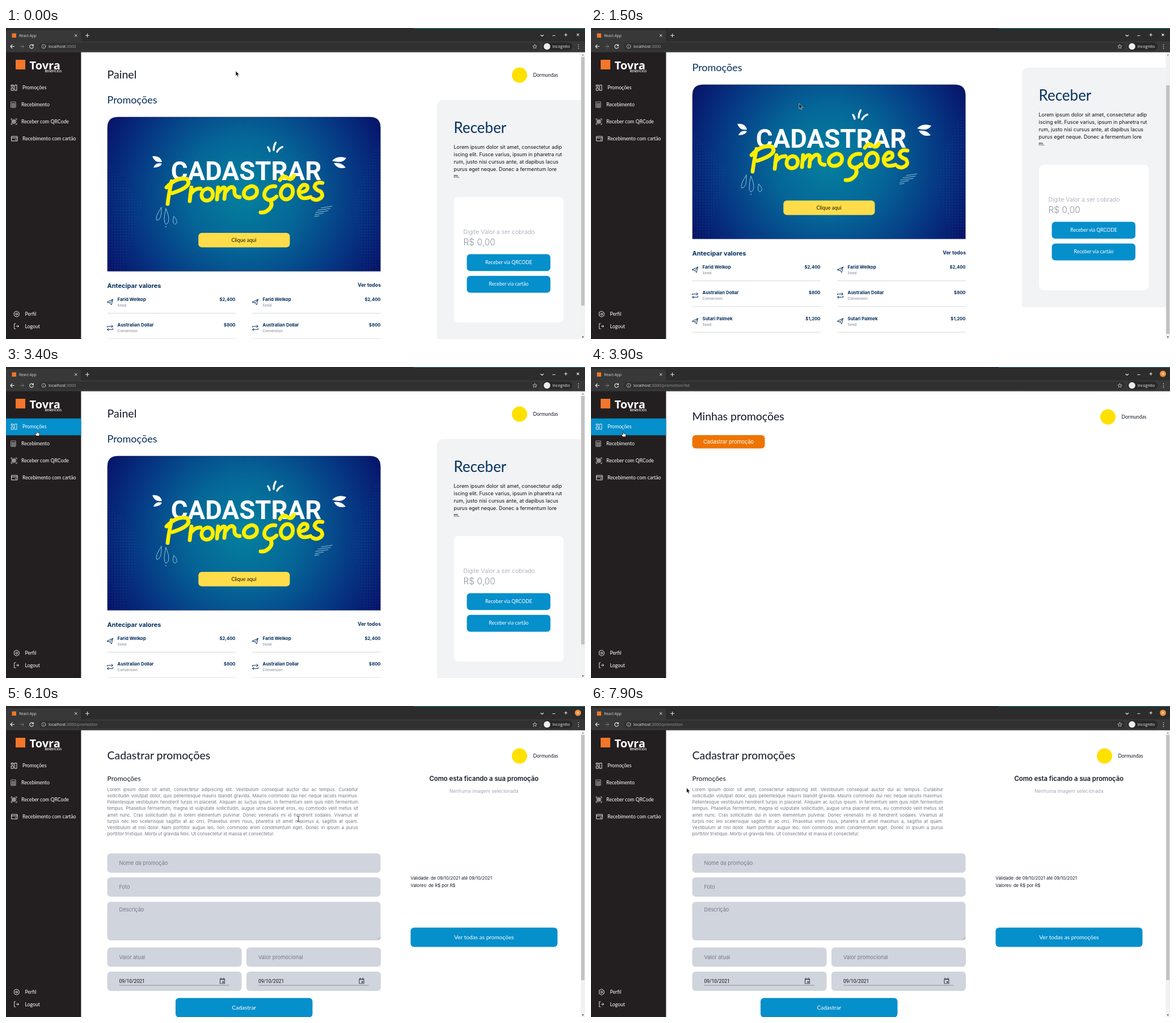
These frames come from a looping animation (1021 by 548 pixels, 8000 ms). An HTML page:

```html
<!DOCTYPE html>
<html lang="pt">
<head>
<meta charset="utf-8">
<title>React App</title>
<style>
html, body { margin: 0; width: 100%; height: 100%; overflow: hidden; background: #fff; }
svg { display: block; width: 1021px; height: 548px; font-family: Inter, "Noto Sans", sans-serif; }
.n { font-family: Lato, "Open Sans", sans-serif; }
.o { font-family: "Open Sans", "Noto Sans", sans-serif; }
.r { font-family: Roboto, Inter, sans-serif; }
.m { text-anchor: middle; }
.e { text-anchor: end; }
.l { fill: none; stroke-linecap: round; stroke-linejoin: round; }
.just { font: 7.8px/11.15px Inter, sans-serif; color: #757a86; }
.just div { white-space: nowrap; text-align-last: justify; }
.just div:last-child { text-align-last: left; }
</style>
</head>
<body>
<script>
const BLUE = '#058fcb', NAVY = '#05305f', INK = '#111827', SIDE = '#231f20';

const text = (x, y, s, size, fill = INK, cls = '', weight = 400) =>
  `<text x="${x}" y="${y}" font-size="${size}" fill="${fill}" class="${cls}" font-weight="${weight}">${s}</text>`;
const box = (x, y, w, h, fill, r = 0, more = '') =>
  `<rect x="${x}" y="${y}" width="${w}" height="${h}" rx="${r}" fill="${fill}" ${more}/>`;
const line = (d, color, width = 1) =>
  `<path class="l" d="${d}" stroke="${color}" stroke-width="${width}"/>`;
const dot = (x, y, r, fill) => `<circle cx="${x}" cy="${y}" r="${r}" fill="${fill}"/>`;
const ring = (x, y, r, color) => `<circle class="l" cx="${x}" cy="${y}" r="${r}" stroke="${color}"/>`;
const at = (x, y, s) => `<g transform="translate(${x} ${y})">${s}</g>`;
const group = (id, s) => `<g id="${id}">${s}</g>`;

const account = (x, y) => dot(x, y, 13.5, '#ffe100') + text(x + 24, y + 3, 'Dormundas', 8.6, INK, 'n');

// Banner
const lettering = line(`M292 270Q287 293 285 310M283 281Q300 262 319 266Q331 279 293 291
  M327 281Q325 295 324 305M325 294Q332 282 343 283
  M355 283C341 286 342 305 355 304C369 302 367 282 355 283
  M374 281L372 302M373 292Q384 275 387 284L385 301M386 291Q397 274 403 284Q401 298 412 298
  M431 279C415 284 416 302 431 300C448 297 445 276 431 279
  M475 279C457 276 448 299 463 303Q470 304 477 297M466 303Q472 313 462 321Q456 326 449 325
  M495 277C481 281 481 302 495 302C510 299 509 275 495 277M483 268Q489 258 496 264T508 260
  M517 290Q535 288 531 278Q522 272 516 287Q516 305 537 298
  M558 273Q546 270 544 280Q547 286 555 288Q562 297 551 302Q546 304 541 301`, '#ffee00', 6.8);

const sparks = `<g fill="#fff">
  <path d="M258 226Q272 224 275 236Q262 238 258 226M260 246Q264 236 275 239Q272 246 260 246"/>
  <path d="M575 234Q584 224 600 229Q594 240 575 234M578 238Q592 236 599 246Q585 250 578 238"/></g>` +
  line('M462 210Q464 213 465 217M475.500 202Q472 208 472 215M487.500 209.500Q481 212 478 218', '#fff', 3.4) +
  line('M274 316Q262 334 266 339Q275 339 274 316M282 318Q276 342 282 346Q292 342 282 318M296 332Q292 343 298 346Q306 342 296 332M281 350h2', '#8fc4d8') +
  line('M556 317L575 314M550 321L572 318M546 325L568 322M545 329L560 326M544 332L552 331', '#8fc4d8');

const banner = `<path d="M179 428.600V175Q179 157 197 157H642Q660.200 157 660.200 175V428.600Z" fill="url(#glow)" stroke="#0b1a3f" stroke-width=".6"/>
  <path d="M180 240L240 310L205 428H180ZM660 190L610 310L632 428H660Z" fill="url(#dots)" opacity=".16"/>` +
  sparks + text(423.500, 268, 'CADASTRAR', 45.6, '#fff', 'r m', 700) + lettering +
  box(339.3, 361, 161.2, 25.6, '#ffdd4a', 6) + text(419.5, 376.5, 'Clique aqui', 9, '#111', 'n m');

// Home
const plane = line('M0 5L10 0L7.5 10L4.8 6.5ZM4.8 6.5L10 0', NAVY);
const swap = line('M0 4V2.5H9.5M7.5 0L10 2.5L7.5 4.500M10 6V8H.5M2.5 6L0 8L2.5 10', NAVY);
const entries = [['Farid Welkop', 'Send', '$2,400', plane],
  ['Australian Dollar', 'Conversion', '$800', swap],
  ['Sutari Palmek', 'Send', '$1,200', plane]];
const column = x => entries.map(([name, kind, sum, icon], i) => at(x, 478 + 45.3 * i,
  at(0, 0, icon) + text(18, 3, name, 7.9, NAVY, '', 700) + text(18, 13, kind, 6.4, '#9a9fae', '', 600) +
  text(226, 3, sum, 7.7, NAVY, 'e', 700) + box(0, 24, 226.5, 1, '#d5d8dc'))).join('');

const lorem = ['Lorem ipsum dolor sit amet, consectetur adip', 'iscing elit. Fusce varius, ipsum in pharetra rut',
  'rum, justo nisi cursus ante, at dapibus lacus', 'purus eget neque. Donec a fermentum lore', 'm.'];
const payButton = (y, s) => box(812.6, y, 147.4, 29.8, BLUE, 6) + text(886.5, y + 17.5, s, 8.7, '#fff', 'n m');

const home = text(178.5, 89, 'Painel', 19.6, INK, 'n') + account(905.5, 83) +
  text(178.5, 132.5, 'Promoções', 18, NAVY, 'n') + banner +
  text(178.5, 458, 'Antecipar valores', 11, NAVY, '', 700) + text(661, 455.5, 'Ver todos', 8.7, NAVY, 'e', 700) +
  column(178.5) + column(434.5) +
  '<path d="M760 549V139Q760 127 772 127H1014V549Z" fill="#f2f3f5"/>' +
  text(789.5, 185, 'Receber', 26, NAVY, 'n') +
  lorem.map((s, i) => text(789.5, 213.3 + 12.75 * i, s, 8.95, '#111')).join('') +
  box(790, 298, 193.5, 221, '#fff', 8) +
  text(806.5, 363, 'Digite Valor a ser cobrado', 10.5, '#9aa0ae', '', 300) +
  text(806.5, 383, 'R$ 0,00', 15.5, '#8f95a3', '', 300) +
  payButton(398.5, 'Receber via QRCODE') + payButton(436.8, 'Receber via cartão');

// List
const list = text(178.5, 93.5, 'Minhas promoções', 19.5, INK, 'n') + account(911.5, 88) +
  box(178.5, 120, 128, 23.5, '#ee7402', 6) + text(242.5, 134.5, 'Cadastrar promoção', 9.2, '#fff', 'm');

// Form
const about = ['Lorem ipsum dolor sit amet, consectetur adipiscing elit. Vestibulum consequat auctor dui ac tempus. Curabitur',
  'sollicitudin volutpat dolor, quis pellentesque mauris blandit gravida. Mauris commodo dui nec neque iaculis maximus.',
  'Pellentesque vestibulum hendrerit turpis in placerat. Aliquam ac luctus ipsum. In fermentum sem quis nibh fermentum',
  'tempus. Phasellus fermentum, magna id vulputate sollicitudin, augue urna placerat eros, eu commodo velit metus sit',
  'amet nunc. Cras sollicitudin dui in lorem elementum pulvinar. Donec venenatis mi id hendrerit sodales. Vivamus at',
  'turpis nec leo scelerisque sagittis at ac orci. Phasellus enim risus, pharetra sit amet maximus a, sagittis at quam.',
  'Vestibulum at nisl dolor. Nam porttitor augue leo, non commodo enim condimentum eget. Donec in ipsum a purus',
  'porttitor tristique. Morbi ut gravida felis. Ut consectetur id massa et consectetur.'];
const field = (x, y, w, h, s, drop = 20) =>
  box(x, y, w, h, '#d0d4dc', 6) + text(x + 21, y + drop, s, 9.2, '#747a86');
const date = x => box(x, 468, 237, 34, '#d0d4dc', 6) + text(x + 21, 487.5, '09/10/2021', 8.5, '#111', 'r') +
  box(x + 21, 491.7, 194.5, .8, '#7d8087') +
  at(x + 198, 479, line('M1 2H9V10H1ZM1 3H9M2.5 0V2M7.5 0V2', '#4b4d52', 1.2) + box(5, 6, 2.7, 2.7, '#4b4d52'));
const action = (x, y, w, s) => box(x, y, w, 34, BLUE, 6) + text(x + w / 2, y + 20.5, s, 10.1, '#fff', 'n m');

const form = text(178.5, 93.5, 'Cadastrar promoções', 19.5, INK, 'n') + account(905.5, 88) +
  text(178.5, 132, 'Promoções', 12.1, INK, 'n') +
  `<foreignObject x="178.5" y="142" width="442.5" height="95"><div class="just">${about.map(s => `<div>${s}</div>`).join('')}</div></foreignObject>` +
  field(178.5, 259.7, 482, 34, 'Nome da promoção') + field(178.5, 302, 482, 34, 'Foto') +
  field(178.5, 345, 482, 68, 'Descrição', 17) + line('M656 411.5L660 407.5M658.5 411.5L660 410', '#777', .7) +
  field(178.5, 425.5, 237, 34, 'Valor atual') + field(424, 425.5, 237, 34, 'Valor promocional') +
  date(178.5) + date(424) + action(299, 514.5, 241.5, 'Cadastrar') +
  text(842.8, 131.7, 'Como esta ficando a sua promoção', 11.3, INK, 'm', 600) +
  text(842.8, 152.5, 'Nenhuma imagem selecionada', 8.4, '#a3a7b3', 'm') +
  text(713.5, 305.5, 'Validade: de 09/10/2021 até 09/10/2021', 7.7) +
  text(713.5, 319, 'Valores: de R$ por R$', 7.7) + action(713.5, 390.5, 259, 'Ver todas as promoções');

// Sidebar
const white = (d, w = 1) => line(d, '#e8e8e8', w);
const menu = [
  [29, 'Promoções', white('M.5.5H4V3H.5ZM.5 5.5H4V10H.5ZM6.5.5H10V10H6.5Z')],
  [27, 'Recebimento', line('M0 0H8V10H0ZM0 3H8M0 5.5H8M0 8H8M2.7 3V10M5.3 3V10', '#a9a6a7', .9)],
  [27, 'Receber com QRCode', line('M0 2V0H2M8 0H10V2M10 8V10H8M2 10H0V8M2 2H4V4H2ZM6 2H8V4H6ZM2 6H4V8H2ZM6 6L8 8M8 6L6 8M5 1V9M1 5H9', '#c9c7c8', .9)],
  [29, 'Recebimento com cartão', white('M1 1H11V9H1ZM1 3.7H11M7.5 6.7H9')]];
const sidebar = box(0, 42, 132.4, 506, SIDE) + group('hover', box(0, 90.7, 132.4, 29.6, BLUE)) +
  box(17, 56, 17, 17, '#f4762a') +
  text(41.5, 73, 'Tovra', 20, '#fff', 'o', 700) + text(98, 78, 'BENEFÍCIOS', 5.2, '#fff', 'o e', 600) +
  menu.map(([x, s, icon], i) => at(9, 100 + 30 * i, icon) + text(x, 108 + 29.9 * i, s, 8.7, '#fff', 'n')).join('') +
  white('M18.7 499L23 501.5V506.7L18.7 509.2L14.4 506.7V501.5Z') + ring(18.7, 504.1, 1.7, '#e8e8e8') +
  white('M17 521H14.5V530H17M18 525.5H22.5M20.5 523.5L22.5 525.5L20.5 527.5', .9) +
  text(33.5, 507, 'Perfil', 8.7, '#fff', 'n') + text(33.5, 528.5, 'Logout', 8.7, '#fff', 'n');

// Browser frame
const chrome = box(0, 0, 1021, 42.5, '#2c2c2c') + box(719, 0, 302, 1, '#137f8a') +
  box(0, 4, 132, 24, '#383838', 4) + box(0, 23.5, 1021, 19, '#383838') +
  box(10.5, 9.5, 7.5, 7.5, '#f4762a') + text(23, 15.5, 'React App', 6.6, '#d6d6d6', 'o') +
  white('M121.5 11.5L125 15M125 11.5L121.5 15M140.5 13.2H146.5M143.5 10.2V16.2') +
  white('M943 12.5L945.3 14.5L947.6 12.5M964 13.5H968M985 12H989.5M987.25 9.75V14.25', 1.2) +
  group('close', dot(1008.5, 12, 5.5, '#f28c35')) + white('M1007 10.5L1010 13.5M1010 10.5L1007 13.5', 1.2) +
  white('M8 32.5H14.5M11 29.5L8 32.5L11 35.5', 1.1) + line('M25 32.5H31.5M28.5 29.5L31.5 32.5L28.5 35.5', '#777') +
  white('M48 31A3.3 3.3 0 1 0 48.3 33.5M48.4 29V31.3H46', 1.1) +
  box(58, 26, 884, 13.5, '#303030', 6.7) +
  ring(66.5, 32.5, 3.5, '#aaa') + line('M66.5 32.5V34.3M66.5 30.8V30.9', '#aaa', .8) +
  '<text class="o" x="75" y="35" font-size="7.2" fill="#e4e4e4">localhost<tspan fill="#9b9b9b" id="path"></tspan></text>' +
  line('M932.5 29L933.6 31.5L936.2 31.7L934.2 33.4L934.9 36L932.5 34.6L930.1 36L930.8 33.4L928.8 31.7L931.4 31.5Z', '#ccc', .8) +
  box(946, 25.5, 53, 14, '#282828', 7) + dot(954, 32.5, 5.8, '#eee') + text(963.5, 35, 'Incognito', 7.1, '#eee', 'o') +
  [29.5, 32.7, 35.9].map(y => dot(1009.5, y, .8, '#ddd')).join('');

const scrollbar = group('bar', box(1013.5, 42, 7.5, 506, '#f1f1f1') + box(1014.2, 51, 6, 438, '#c1c1c1', 0, 'id="thumb"') +
  '<path d="M1015.5 48.5L1017.3 46L1019 48.5Z" fill="#8a8a8a"/><path d="M1015.5 543.5L1017.3 546L1019 543.5Z" fill="#444"/>');

const cursors = group('arrow', '<path d="M0 0V9L2 7.2L3.5 10.5L5 9.8L3.6 6.7H6.3Z" fill="#111" stroke="#fff" stroke-width=".6"/>') +
  group('hand', '<path d="M-.8 1Q0-.5.8 1V4L4 5Q5 5.5 4.5 7.5L4 10H-1L-3.3 6.5Q-3.5 5-2 5.5L-.8 6.5Z" fill="#fff" stroke="#111" stroke-width=".8"/>') +
  group('beam', line('M-1.5-4.5Q0-4.5 0-3.5Q0-4.5 1.5-4.5M0-3.5V3.5M-1.5 4.5Q0 4.5 0 3.5Q0 4.5 1.5 4.5', '#222', .8));

document.body.innerHTML = `<svg viewBox="0 0 1021 548"><defs>
  <radialGradient id="glow" gradientUnits="userSpaceOnUse" cx="420" cy="290" r="285">
    <stop offset="0" stop-color="#04819f"/><stop offset=".35" stop-color="#056697"/>
    <stop offset=".7" stop-color="#063683"/><stop offset="1" stop-color="#070d64"/></radialGradient>
  <pattern id="dots" width="5" height="5" patternUnits="userSpaceOnUse"><circle cx="2" cy="2" r=".9" fill="#2f97d4"/></pattern></defs>` +
  group('home', home) + group('list', list) + group('form', form) + sidebar + scrollbar + chrome + group('pointer', cursors) + '</svg>';

// Timeline: [time, value...]
const homeScroll = [[1100, 0], [1200, 10], [1300, 32.5], [1400, 51], [1500, 57], [1800, 57], [1900, 35], [2000, 12.5], [2100, 0]];
const formScroll = [[6100, 0], [6200, 38], [6300, 64], [6900, 64], [7000, 38], [7100, 10], [7200, 10], [7300, 0]];
const moves = [[700, 405, 75.5], [800, 394, 93], [1000, 367, 133], [2400, 367, 133], [2500, 366, 132.5],
  [3300, 366, 132.5], [3400, 54.5, 111.5], [3600, 57, 113], [4300, 57, 113], [5000, 271.5, 128],
  [5500, 271.5, 128], [6000, 515.5, 199], [7400, 515.5, 199], [7600, 342, 173], [7700, 342, 173], [7900, 168.5, 144]];

function sample(keys, t) {
  const i = keys.findIndex(k => k[0] > t);
  if (i === 0) return keys[0].slice(1);
  if (i < 0) return keys[keys.length - 1].slice(1);
  const a = keys[i - 1], b = keys[i], f = (t - a[0]) / (b[0] - a[0]);
  return a.slice(1).map((v, j) => v + (b[j + 1] - v) * f);
}

const $ = id => document.getElementById(id);
const show = (id, on) => $(id).style.display = on ? '' : 'none';
const paths = { home: ':3000', list: ':3000/promotion/list', form: ':3000/promotion' };

function draw(now) {
  const t = Math.floor(now % 8000 / 100) * 100;
  const page = t < 3800 ? 'home' : t < 5200 ? 'list' : 'form';
  const [scroll] = page === 'list' ? [0] : sample(page === 'home' ? homeScroll : formScroll, t);
  const [x, y] = sample(moves, t);
  for (const id in paths) show(id, id === page);
  $(page).setAttribute('transform', `translate(0 ${-scroll})`);
  $('path').textContent = paths[page];
  show('bar', page !== 'list');
  $('thumb').setAttribute('y', 51 + scroll * .875);
  $('thumb').setAttribute('height', page === 'home' ? 438 : 432);
  show('close', t >= 3800);

  const onMenu = x < 132 && y > 91 && y < 120;
  const onButton = page === 'list' && x > 178 && x < 306 && y > 120;
  const onText = page === 'form' && x > 179 && x < 621 && y > 142 && y < 232;
  show('hover', onMenu);
  show('hand', onMenu || onButton);
  show('beam', onText);
  show('arrow', !onMenu && !onButton && !onText);
  $('pointer').setAttribute('transform', `translate(${x} ${y})`);
}

const start = performance.now();
(function tick() {
  draw(performance.now() - start);
  requestAnimationFrame(tick);
})();
</script>
</body>
</html>
```
